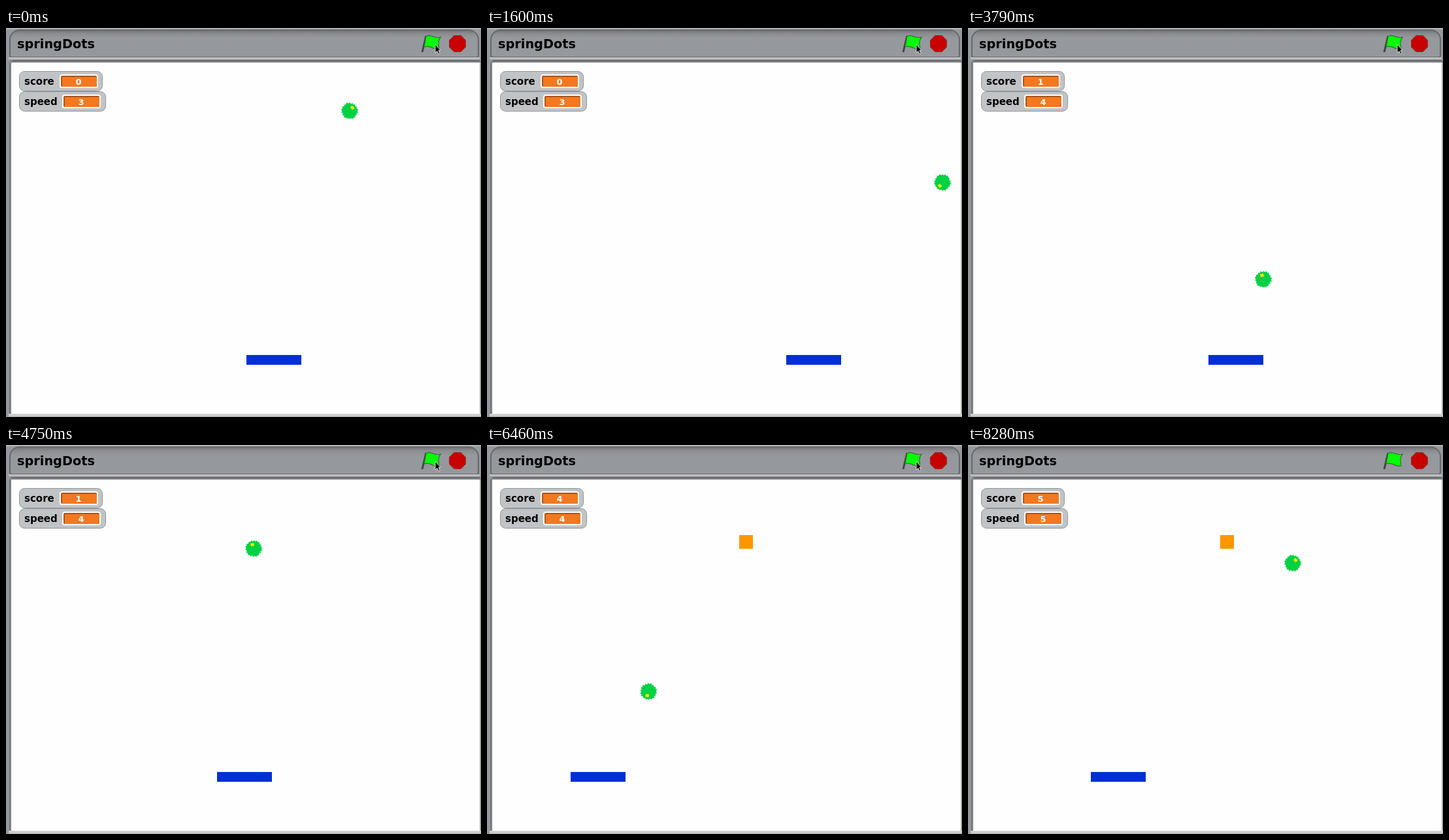
Animation, 727 px wide and 596 px high, one loop 8380 ms. Source, as an HTML page with a canvas:

```html
<!DOCTYPE html>
<html lang="en">
<head>
<meta charset="utf-8">
<title>springDots</title>
<style>
html, body { margin: 0; width: 100%; height: 100%; overflow: hidden; background: #95989c; }
canvas { display: block; }
</style>
</head>
<body>
<canvas id="stage" width="727" height="596"></canvas>
<script>
const ctx = document.getElementById('stage').getContext('2d');
const LOOP = 8380;
const FONT = '"DejaVu Sans", Verdana, sans-serif';

// [step, ms]: the game redraws in uneven steps
const CLOCK = [[0, 0], [1, 100], [10, 870], [11, 960], [19, 1600], [21, 1780], [22, 1870],
  [28, 2370], [31, 2640], [32, 2730], [42, 3550], [43, 3640], [45, 3790], [52, 4390],
  [53, 4480], [62, 5260], [63, 5330], [68, 5740], [72, 6100], [73, 6190], [82, 6970],
  [83, 7030], [85, 7210], [92, 7830], [93, 7930], [97, 8280]];

// [ms, x, y] at each bounce or change of pace
const BALL = [[0, 526, 127], [428, 578, 65], [1502, 709, 222.5], [2370, 604, 348],
  [3357, 486, 488], [3790, 452, 385], [5133, 349, 65], [5740, 302.5, 209.5],
  [6915, 211, 488], [7210, 272, 422], [8280, 497, 181]];

// [ms, left edge]
const PADDLE = [[0, 368], [500, 368], [860, 248], [1000, 248], [1600, 458], [1870, 458],
  [2300, 323], [2650, 323], [3200, 458], [3550, 458], [3790, 368], [4060, 263],
  [4450, 428], [5150, 173], [5300, 173], [5700, 278], [5800, 278], [6100, 218],
  [6450, 128], [6700, 128], [6900, 188]];

function segment(keys, t) {
  let i = 0;
  while (i < keys.length - 2 && t >= keys[i + 1][0]) i++;
  return [keys[i], keys[i + 1]];
}

function sample(keys, t, col = 1) {
  const [a, b] = segment(keys, t);
  const k = Math.min(1, (t - a[0]) / (b[0] - a[0]));
  return a[col] + (b[col] - a[col]) * k;
}

const TICKS = Array.from({ length: 98 }, (_, i) => Math.round(sample(CLOCK, i) / 10) * 10);

function box(x, y, w, h, color) {
  ctx.fillStyle = color;
  ctx.fillRect(x, y, w, h);
}

function round(x, y, w, h, r, fill, line) {
  ctx.beginPath();
  ctx.roundRect(x, y, w, h, r);
  ctx.fillStyle = fill;
  ctx.fill();
  if (line) {
    ctx.strokeStyle = line;
    ctx.stroke();
  }
}

function poly(points, fill, line, width = 1) {
  ctx.beginPath();
  points.forEach(([x, y]) => ctx.lineTo(x, y));
  ctx.closePath();
  ctx.fillStyle = fill;
  ctx.fill();
  if (line) {
    ctx.strokeStyle = line;
    ctx.lineWidth = width;
    ctx.stroke();
    ctx.lineWidth = 1;
  }
}

function label(text, x, y, size, color, align = 'left') {
  ctx.font = `bold ${size}px ${FONT}`;
  ctx.textAlign = align;
  ctx.fillStyle = color;
  ctx.fillText(text, x, y);
}

function chrome() {
  box(0, 0, 727, 596, '#95989c');
  box(0, 0, 727, 2, '#b4b6b9');
  const shade = ctx.createLinearGradient(0, 2, 0, 46);
  shade.addColorStop(0, '#66686a');
  shade.addColorStop(0.14, '#898b8f');
  shade.addColorStop(0.3, '#95989c');
  shade.addColorStop(1, '#95989c');
  ctx.lineWidth = 2;
  round(6, 3, 717, 42, [15, 15, 3, 3], shade, '#66686b');
  ctx.lineWidth = 1;
  box(4, 45, 721, 2, '#c6c8ca');
  box(4, 47, 721, 2, '#a5a7aa');
  round(5, 49, 722, 545, [6, 4, 0, 0], '#66686b');
  box(6, 51, 720, 542, '#85878a');
  box(8, 53, 717.5, 538, '#fefefe');
  box(725.5, 53, 1.5, 543, '#a0a2a5');
  box(4, 591, 723, 5, '#d0d1d3');
  box(4, 594.5, 723, 1.5, '#b4b6b8');
  label('springDots', 17, 31, 19.3, '#000');
}

function flag() {
  ctx.strokeStyle = '#454545';
  ctx.lineWidth = 3;
  ctx.beginPath();
  ctx.moveTo(643, 12);
  ctx.lineTo(637, 37);
  ctx.stroke();
  ctx.beginPath();
  ctx.moveTo(643, 13);
  ctx.bezierCurveTo(650, 8, 655, 17, 665, 14);
  ctx.quadraticCurveTo(660, 20, 663, 32);
  ctx.bezierCurveTo(654, 35, 650, 25, 640, 29);
  ctx.closePath();
  ctx.fillStyle = '#00ff00';
  ctx.fill();
  ctx.strokeStyle = '#3c6a3c';
  ctx.lineWidth = 1.2;
  ctx.stroke();
  ctx.lineWidth = 1;
}

function stopSign() {
  const pts = Array.from({ length: 8 }, (_, i) => {
    const a = (i + 0.5) * Math.PI / 4;
    return [691 + 13.5 * Math.cos(a), 24 + 13.5 * Math.sin(a)];
  });
  poly(pts, '#c80000', '#8c3030');
}

function cursor() {
  poly([[657, 25], [657, 38], [660, 35.5], [662, 40], [664, 39], [662, 34.5], [665, 34]],
    '#000', '#fff', 0.8);
}

function monitor(name, value, y, w, slot) {
  round(20.5, y + 0.5, w, 30, 8, '#c1c4c7', '#949494');
  label(name, 28, y + 21, 15, '#000');
  round(slot, y + 5, 59, 21, 4, '#fff');
  round(slot + 2, y + 7, 55, 17, 2, '#a8561c');
  box(slot + 4, y + 9, 53, 15, '#f37820');
  label(value, slot + 29, y + 20.5, 13, '#fff', 'center');
}

function ball(t) {
  const [a, b] = segment(BALL, t);
  const n = 36;
  const rim = Array.from({ length: n }, (_, i) => {
    const r = 12.2 + (i % 2 ? -0.9 : 0.9) + 0.4 * Math.sin(i * 5.3);
    const turn = i * 2 * Math.PI / n;
    return [r * Math.cos(turn), r * Math.sin(turn)];
  });
  ctx.save();
  ctx.translate(sample(BALL, t, 1), sample(BALL, t, 2));
  ctx.rotate(Math.atan2(b[2] - a[2], b[1] - a[1]));
  poly(rim, '#00d144');
  box(4.2, -2.6, 4.4, 5.2, '#f0f000');
  ctx.restore();
}

function draw(t) {
  chrome();
  flag();
  stopSign();
  if (t < 7500) cursor();
  const bonus = t >= 5330;
  const hits = (t >= 3460) + (t >= 7030);
  monitor('score', bonus ? 3 + hits : hits, 66, 127, 82);
  monitor('speed', 3 + hits, 97, 132, 86);
  if (bonus) box(386, 138, 21, 21, '#ff9600');
  // the paddle moves in jumps of 15
  const left = 368 + 15 * Math.round((sample(PADDLE, t) - 368) / 15);
  box(left, 501, 84, 15, '#0030d2');
  ball(t);
}

const start = performance.now();
function loop() {
  const t = (performance.now() - start) % LOOP;
  let i = TICKS.length - 1;
  while (i > 0 && TICKS[i] > t) i--;
  draw(TICKS[i]);
  requestAnimationFrame(loop);
}
loop();
</script>
</body>
</html>
```
